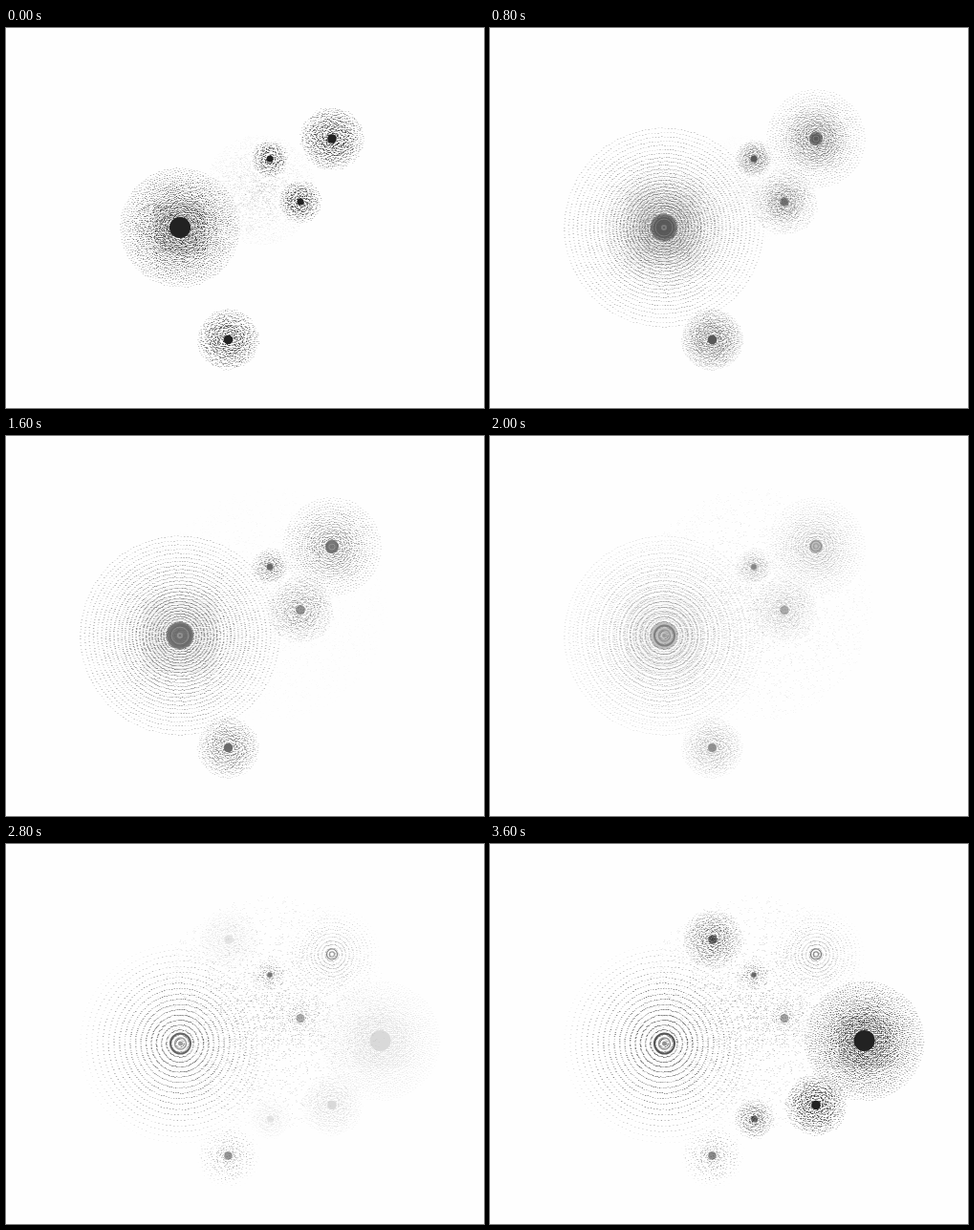
Write an HTML page with a canvas that moves like this. It is 500 by 398 pixels and loops after 4.1 s.

```html
<!DOCTYPE html>
<html>
<head>
<meta charset="utf-8">
<style>
  html, body { margin: 0; height: 100%; overflow: hidden; background: #fefefe; }
  canvas { display: block; }
</style>
</head>
<body>
<canvas id="stage" width="500" height="398"></canvas>
<script>
const W = 500, H = 398, TAU = Math.PI * 2, INK = '#222';
const STEP = 200, LAST = 3600, LOOP = 4100;

let seed = 7;
function random() {
  seed = (seed * 16807) % 2147483647;
  return seed / 2147483647;
}

function layer(paint) {
  const canvas = document.createElement('canvas');
  canvas.width = W;
  canvas.height = H;
  const g = canvas.getContext('2d');
  g.fillStyle = g.strokeStyle = INK;
  paint(g);
  return canvas;
}

// Rows are snapped to whole pixels, so that dots read as short dashes.
function dot(g, x, y, alpha, width = 1) {
  g.globalAlpha = alpha;
  g.fillRect(x - width / 2, Math.round(y - 0.5), width, 1);
}

// Concentric dotted rings; `power` widens the gaps outwards, `fade` lightens the rim.
function rings(g, x, y, { radius, count, dots, power = 1, jitter = 0, fade = 0.3, tone = 1, width = 1 }) {
  for (let k = 1; k <= count; k++) {
    const u = k / count, r = radius * u ** power;
    const n = Math.min(dots, Math.ceil(r * 5)), turn = random() * TAU;
    for (let i = 0; i < n; i++) {
      const a = turn + TAU * i / n, d = r + (random() - 0.5) * jitter;
      const alpha = tone * (0.25 + 0.75 * random()) * (1 - fade * u ** 3);
      dot(g, x + d * Math.cos(a), y + d * Math.sin(a), alpha, width);
    }
  }
}

// Square weave of dots around a core.
function weave(g, x, y, half, tone) {
  for (let dy = -half; dy <= half; dy += 2)
    for (let dx = -half; dx <= half; dx += 2)
      dot(g, x + dx, y + dy, tone * (1 - 0.6 * Math.hypot(dx, dy) / half / 1.42));
}

function disc(g, x, y, r, alpha = 1) {
  g.globalAlpha = alpha;
  g.beginPath();
  g.arc(x, y, r, 0, TAU);
  g.fill();
}

function circle(g, x, y, r, width, alpha) {
  g.globalAlpha = alpha;
  g.lineWidth = width;
  g.beginPath();
  g.arc(x, y, r, 0, TAU);
  g.stroke();
}

function cloud(g, x, y, radius, count, tone) {
  for (let i = 0; i < count; i++) {
    const r = radius * random() ** 0.58, a = random() * TAU;
    dot(g, x + r * Math.cos(a), y + r * Math.sin(a), tone * (1 - 0.8 * r / radius));
  }
}

function burst(g, x, y, radius, tone = 1) {
  const big = radius > 50;
  rings(g, x, y, { radius, count: Math.round(radius / 1.9), dots: big ? 125 : radius * 2.7,
    power: 1.12, jitter: big ? 1.6 : 3, fade: 0.65, tone, width: 1.2 });
  if (big) weave(g, x, y, 26, 0.5 * tone);
  disc(g, x, y, big ? 11 : radius < 25 ? 3.5 : 4.8, tone);
}

const burstLayer = layer(g => {
  burst(g, 182, 209, 62);
  burst(g, 341, 116, 32);
  burst(g, 276, 137, 18);
  burst(g, 308, 182, 21);
  burst(g, 232.5, 326.5, 31);
  cloud(g, 266, 170, 58, 2400, 0.15);
});

const spreadLayer = layer(g => {
  rings(g, 182, 209, { radius: 104, count: 32, dots: 190, power: 1.42, jitter: 0.8, fade: 0.5, tone: 0.9, width: 1.4 });
  weave(g, 182, 209, 38, 0.4);
  disc(g, 182, 209, 14, 0.92);
  g.strokeStyle = '#999';
  circle(g, 182, 209, 9, 1, 0.45);
  circle(g, 182, 209, 2, 2, 0.5);
  rings(g, 341, 116, { radius: 51, count: 21, dots: 95, power: 1.2, jitter: 1.4, fade: 0.65, tone: 0.9, width: 1.3 });
  disc(g, 341, 116, 7, 0.9);
  circle(g, 341, 116, 3, 1, 0.5);
  burst(g, 276, 137, 18, 0.95);
  rings(g, 308, 182, { radius: 34, count: 17, dots: 80, jitter: 3, fade: 0.65, tone: 0.7, width: 1.2 });
  disc(g, 308, 182, 5, 0.65);
  burst(g, 232.5, 326.5, 31, 0.95);
});

const ringLayer = layer(g => {
  rings(g, 182, 209, { radius: 104, count: 19, dots: 135, power: 1.08, jitter: 0.6, fade: 0.9, tone: 0.9, width: 1.3 });
  circle(g, 182.5, 209, 10.5, 2, 0.95);
  circle(g, 182.5, 209, 6, 1.5, 0.6);
  disc(g, 182.5, 209, 2.5, 0.6);
  rings(g, 341, 116, { radius: 50, count: 13, dots: 70, power: 1.05, jitter: 0.7, fade: 0.9, tone: 0.5 });
  circle(g, 341, 115.5, 5.5, 1.2, 0.75);
  circle(g, 341, 115.5, 2.5, 1.2, 0.6);
  rings(g, 276, 137, { radius: 18, count: 9, dots: 24, jitter: 3, fade: 0.85, tone: 0.7 });
  disc(g, 276, 137, 2.8, 0.8);
  rings(g, 308, 182, { radius: 32, count: 12, dots: 34, jitter: 4, fade: 0.85, tone: 0.5 });
  disc(g, 308, 182.5, 4.5, 0.5);
  rings(g, 232.5, 326.5, { radius: 32, count: 12, dots: 40, jitter: 4, fade: 0.9, tone: 0.6 });
  disc(g, 232.5, 326.5, 4.3, 0.65);
  cloud(g, 278, 176, 122, 3000, 0.38);
});

const nextLayer = layer(g => {
  burst(g, 391.5, 206, 62);
  burst(g, 341, 273.5, 31);
  burst(g, 276.5, 288, 20, 0.65);
  burst(g, 233, 100, 30, 0.65);
});

// Each layer fades through [time, opacity] points.
const fades = [
  [burstLayer, [[0, 1], [400, 0.8], [800, 0.4], [1200, 0]]],
  [spreadLayer, [[400, 0], [800, 0.6], [1200, 1], [2000, 0.3], [2600, 0]]],
  [ringLayer, [[1400, 0], [2000, 0.42], [2800, 0.72], [3600, 0.8]]],
  [nextLayer, [[2600, 0], [2800, 0.16], [3200, 0.52], [3600, 1]]],
];

function valueAt(points, t) {
  if (t <= points[0][0]) return points[0][1];
  for (let i = 1; i < points.length; i++) {
    const [t0, v0] = points[i - 1], [t1, v1] = points[i];
    if (t <= t1) return v0 + (v1 - v0) * (t - t0) / (t1 - t0);
  }
  return points[points.length - 1][1];
}

const stage = document.getElementById('stage').getContext('2d');

function draw(now) {
  const t = Math.min(LAST, Math.floor(now % LOOP / STEP) * STEP);
  stage.globalAlpha = 1;
  stage.fillStyle = '#fefefe';
  stage.fillRect(0, 0, W, H);
  for (const [image, points] of fades) {
    stage.globalAlpha = valueAt(points, t);
    stage.drawImage(image, 0, 0);
  }
}

const start = performance.now();
function tick() {
  draw(performance.now() - start);
  requestAnimationFrame(tick);
}
tick();
</script>
</body>
</html>
```
